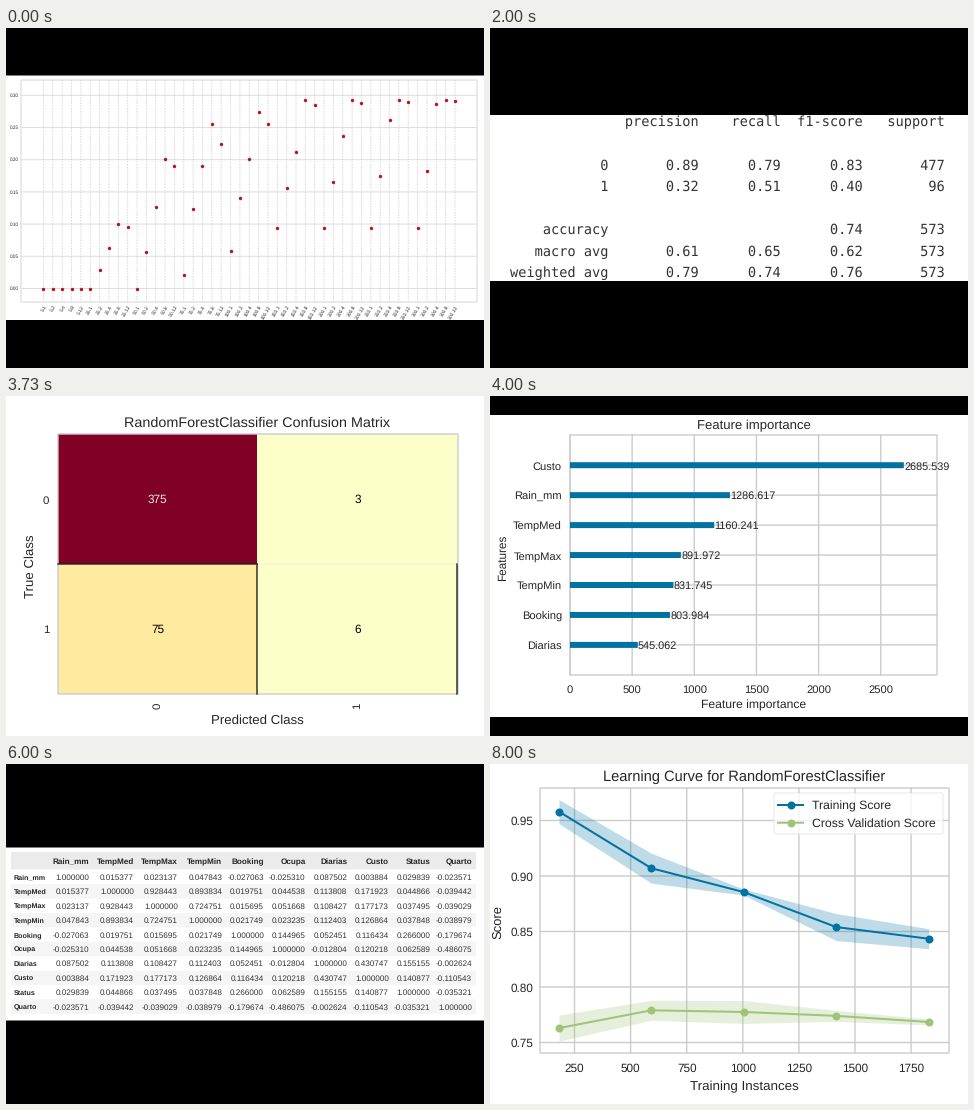
A matplotlib script for the animation above (8990 ms loop, 478 by 340 pixels).

```python
import matplotlib.pyplot as plt
import numpy as np
from matplotlib.animation import FuncAnimation
from matplotlib.patches import FancyBboxPatch, Rectangle

W, H, DPI = 478, 340, 100
STEP, LOOP, HOLD = 10, 8990, 1000
PX = 72 / DPI
BLUE, GREEN, GRID, INK = "#0272a2", "#9fc377", "#cccccc", "#262626"

plt.rcParams["font.family"] = "Liberation Sans"
plt.rcParams["text.hinting"] = "none"

fig = plt.figure(figsize=(W / DPI, H / DPI), dpi=DPI)


class Stage:
    """Pixel canvas with the origin at the top left."""

    def __init__(self, top=0, bottom=H):
        fig.clear()
        fig.set_facecolor("white" if top == 0 else "black")
        self.ax = fig.add_axes([0, 0, 1, 1])
        self.ax.set(xlim=(0, W), ylim=(H, 0))
        self.ax.axis("off")
        self.box(0, top, W, bottom, "white")

    def box(self, x0, y0, x1, y1, fill="none", edge="none", width=1.4, z=1):
        self.ax.add_patch(Rectangle((x0, y0), x1 - x0, y1 - y0, facecolor=fill,
                                    edgecolor=edge, linewidth=width * PX,
                                    zorder=z, snap=False))

    def line(self, x, y, color=GRID, width=1.4, z=2, **kw):
        self.ax.plot(x, y, color=color, lw=width * PX, zorder=z, snap=False, **kw)

    def text(self, x, y, s, size, ha="center", color=INK, rot=0, **kw):
        drop = 0.36 * size
        a = np.radians(rot)
        self.ax.text(x + drop * np.sin(a), y + drop * np.cos(a), s, size=size * PX,
                     ha=ha, va="baseline", color=color, rotation=rot,
                     rotation_mode="anchor", zorder=8, **kw)

    def legend_box(self, x0, y0, x1, y1):
        self.ax.add_patch(FancyBboxPatch(
            (x0, y0), x1 - x0, y1 - y0, boxstyle="round,pad=0,rounding_size=2",
            facecolor="white", edgecolor="#e2e2e2", alpha=0.8,
            linewidth=PX, zorder=6))

    def picture(self):
        fig.canvas.draw()
        return np.array(fig.canvas.buffer_rgba())


def scatter_slide():
    s = Stage(47.5, 292)
    s.box(15, 52, 471, 274, edge="#d6d6d6", width=1)
    for k in range(7):
        y = 260.5 - 32.2 * k
        s.line([15, 471], [y, y], "#dedede", 1)
        s.text(13, y, f"{0.05 * k:.2f}", 4.6, "right")
    sizes, depths = (5, 25, 50, 75, 100, 150, 200, 250, 300), (1, 2, 4, 8, 12)
    # Rise of the score per depth as the size grows, bent at shared knots.
    knots = (0, 2, 3, 5, 8)
    rises = ((0, 14, 61, 61), (37, 80, 101, 118), (82, 123, 137, 185),
             (130, 165, 189, 189), (123, 145, 184, 188))
    for g, n in enumerate(sizes):
        for d, depth in enumerate(depths):
            x = 37.5 + 9.352 * (5 * g + d)
            y = 260.5 - np.interp(g, knots, (0, *rises[d]))
            s.line([x, x], [52, 274], "#d0d0d0", 0.8, ls=(0, (2, 1.5)))
            s.text(x + 2, 277.5, f"{n}.{depth}", 5, "right", rot=60)
            s.line([x], [y], "#b8141a", z=5, marker="o", ms=3.4 * PX, mew=0)
    return s.picture()


def report_slide():
    s = Stage(87, 253)
    report = """precision recall f1-score support

0 0.89 0.79 0.83 477
1 0.32 0.51 0.40 96

accuracy - - 0.74 573
macro_avg 0.61 0.65 0.62 573
weighted_avg 0.79 0.74 0.76 573"""
    for k, row in enumerate(report.split("\n")):
        words = [w.strip("-").replace("_", " ") for w in row.split()]
        if k == 0:
            words.insert(0, "")
        if words:
            line = f"{words[0]:>12} " + "".join(f"{w:>10}" for w in words[1:])
            s.text(20.3, 93.6 + 21.55 * k, line, 13.65, "left", "#333333",
                   family="DejaVu Sans Mono")
    return s.picture()


def matrix_slide():
    s = Stage()
    xs, ys = (52, 251, 452), (38, 168, 298)
    cells = (("375", "#800026", "#e8e8e8"), ("3", "#fdffc9", "black"),
             ("75", "#feeb9f", "black"), ("6", "#fdffc9", "black"))
    for k, (label, fill, ink) in enumerate(cells):
        r, c = divmod(k, 2)
        s.box(xs[c], ys[r], xs[c + 1], ys[r + 1], fill)
        s.text((xs[c] + xs[c + 1]) / 2, (ys[r] + ys[r + 1]) / 2, label, 11.8,
               color=ink)
    s.box(52, 38, 452, 298, edge=GRID, z=3)
    s.line([251, 452], [168, 168], "#f4f4e0", z=4)
    s.line([52, 251], [168, 168], "#222222", z=4)
    for x in (251, 451):
        s.line([x, x], [168, 298], "#222222", z=4)
    for k in range(2):
        s.text(40, 104 + 129 * k, str(k), 11.5)
        s.text(150 + 200 * k, 310, str(k), 11.5, rot=90)
    s.text(251, 25.5, "RandomForestClassifier Confusion Matrix", 14.4)
    s.text(251.5, 323, "Predicted Class", 13.2)
    s.text(23, 170, "True Class", 13.2, rot=90)
    return s.picture()


def importance_slide():
    s = Stage(19, 321)
    scale = 62.15 / 500
    for v in range(0, 2501, 500):
        x = 80 + v * scale
        s.line([x, x], [39, 279])
        s.text(x, 293, str(v), 11.2)
    data = {"Custo": 2685.539, "Rain_mm": 1286.617, "TempMed": 1160.241,
            "TempMax": 891.972, "TempMin": 831.745, "Booking": 803.984,
            "Diarias": 545.062}
    for k, (name, v) in enumerate(data.items()):
        y, x = 69.2 + 29.95 * k, 80 + v * scale
        s.line([80, 447], [y, y])
        s.box(80, y - 3, x, y + 3, BLUE, z=4)
        s.text(x + 0.3, y + 0.3, f"{v:.3f}", 10.9, "left")
        s.text(72, y + 0.5, name, 11.1, "right")
    s.box(80, 39, 447, 279, edge=GRID, z=3)
    s.text(264, 29, "Feature importance", 13.15)
    s.text(263.5, 308, "Feature importance", 12.1)
    s.text(12, 162, "Features", 11.8, rot=90)
    return s.picture()


def table_slide():
    s = Stage(83.5, 256.5)
    names = ("Rain_mm TempMed TempMax TempMin Booking "
             "Ocupa Diarias Custo Status Quarto").split()
    # Upper triangle of the symmetric table, row by row.
    upper = [
        0.015377, 0.023137, 0.047843, -0.027063, -0.025310, 0.087502, 0.003884,
        0.029839, -0.023571,
        0.928443, 0.893834, 0.019751, 0.044538, 0.113808, 0.171923, 0.044866,
        -0.039442,
        0.724751, 0.015695, 0.051668, 0.108427, 0.177173, 0.037495, -0.039029,
        0.021749, 0.023235, 0.112403, 0.126864, 0.037848, -0.038979,
        0.144965, 0.052451, 0.116434, 0.266000, -0.179674,
        -0.012804, 0.120218, 0.062589, -0.486075,
        0.430747, 0.155155, -0.002624,
        0.140877, -0.110543, -0.035321]
    corr = np.eye(10)
    corr[np.triu_indices(10, 1)] = upper
    corr = np.maximum(corr, corr.T) + np.minimum(corr, corr.T) - np.eye(10)
    rights = np.interp(range(10), (0, 3, 9), (83.5, 216.3, 466))
    s.box(5, 88, 470, 105.5, "#ebebeb")
    for r, name in enumerate(names):
        y = 113 + 14.4 * r
        if r % 2:
            s.box(5, y - 7.2, 470, y + 7.2, "#f5f5f5")
        s.text(rights[r], 97.3, name, 8.1, "right", weight="bold")
        s.text(8, y, name, 7.1, "left", weight="bold")
        for x, v in zip(rights, corr[r]):
            s.text(x, y, f"{v:.6f}", 8.2, "right", "#333333")
    return s.picture()


def staircase(x_knots, y_knots, seed):
    """Step curve through a few knots, with slightly irregular treads."""
    rng = np.random.default_rng(seed)
    inner = np.linspace(0, 1, 75)[1:-1]
    x = np.r_[0, np.sort(inner + rng.uniform(-0.008, 0.008, inner.size)), 1]
    y = np.interp(x, x_knots, y_knots)
    return x, np.maximum.accumulate(np.clip(y + rng.normal(0, 0.004, x.size) *
                                            (1 - x), 0, 1))


def roc_slide(model, seed, aucs):
    s = Stage(8, 332)
    to_x = lambda v: 68 + 391.5 * np.asarray(v)
    to_y = lambda v: 288 - 255 * np.asarray(v)
    for v in np.arange(6) / 5:
        x, y = to_x(v), to_y(v)
        s.line([x, x], [33, 288])
        s.line([68, 459.5], [y, y])
        s.text(x, 302, f"{v:.1f}", 11.5)
        s.text(60, y, f"{v:.1f}", 11.5, "right")

    normal = staircase((0, .02, .2, .35, .6, 1), (0, .16, .57, .74, .85, 1), seed)
    cancelled = staircase((0, .1, .24, .35, .57, .84, 1),
                          (0, .27, .6, .75, .86, .96, 1), seed + 1)
    x = np.linspace(0, 1, 200)
    micro = x, 1 - (1 - x) / (1 + 17 * x)
    macro = x, (np.interp(x, *normal) + np.interp(x, *cancelled)) / 2
    dash = (0, (3.7, 1.6))
    curves = ((normal, BLUE, "-", "ROC of class Normal"),
              (cancelled, GREEN, "-", "ROC of class Cancelado"),
              (micro, GREEN, dash, "micro-average ROC curve"),
              (macro, GREEN, dash, "macro-average ROC curve"))
    s.legend_box(204, 208, 454, 283)
    for k, ((cx, cy), color, ls, label) in enumerate(curves):
        style = "steps-mid" if ls == "-" else "default"
        s.line(to_x(cx), to_y(cy), color, 2, z=4, ls=ls, drawstyle=style)
        y = 218 + 17.9 * k
        s.line([208, 233], [y, y], color, 2.1, z=7, ls=ls)
        s.text(242.5, y, f"{label}, AUC = {aucs[k]:.2f}", 11.6, "left")
    s.line([68, 459.5], [288, 33], "#222222", 2, z=4, ls=(0, (1, 1.65)))
    s.text(263.5, 21, f"ROC Curves for {model}", 14)
    s.text(263, 318, "False Positive Rate", 12.8)
    s.text(30.3, 167, "True Postive Rate", 12, rot=90)
    return s.picture()


def learning_slide(model, shift=0):
    s = Stage()
    for k in range(7):
        x = 84.5 + 56.1 * k
        s.line([x, x], [24, 289])
        s.text(x, 303.5, str(250 * (k + 1)), 11.7)
    for k in range(5):
        y = 56.5 + 55.5 * k
        s.line([50, 459], [y, y])
        s.text(43, y + 0.5, f"{0.95 - 0.05 * k:.2f}", 11.7, "right")
    s.box(50, 24, 459, 289, edge=GRID, z=3)
    s.legend_box(284, 29, 453, 70)
    xs = 69 + 92.4 * np.arange(5)
    to_y = lambda v: 56.5 + 1110 * (0.95 - np.asarray(v)) + shift
    series = (
        ("Training Score", BLUE, (0.958, 0.907, 0.8855, 0.854, 0.8435),
         (12, 15, 3, 13.5, 10)),
        ("Cross Validation Score", GREEN, (0.763, 0.779, 0.7775, 0.774, 0.7685),
         (13, 10, 11.5, 5.5, 3)))
    for k, (label, color, scores, spread) in enumerate(series):
        mid = to_y(scores)
        s.ax.fill_between(xs, mid - spread, mid + spread, color=color,
                          alpha=0.25, lw=0, zorder=4)
        s.line(xs, mid, color, 2, z=5, marker="o", ms=8 * PX, mew=0)
        y = 41 + 17.7 * k
        s.line([288, 301, 313], [y] * 3, color, 2, z=7, marker="o",
               ms=8 * PX, mew=0, markevery=[1])
        s.text(322.5, y, label, 12.2, "left")
    s.text(254, 12, f"Learning Curve for {model}", 14.6)
    s.text(254, 321.5, "Training Instances", 13.4)
    s.text(7, 158, "Score", 13, rot=90)
    return s.picture()


slides = [
    scatter_slide(),
    learning_slide("LGBMClassifier", shift=-2),
    report_slide(),
    matrix_slide(),
    importance_slide(),
    roc_slide("RandomForestClassifier", 21, (0.72, 0.72, 0.87, 0.72)),
    table_slide(),
    roc_slide("LGBMClassifier", 4, (0.73, 0.73, 0.88, 0.73)),
    learning_slide("RandomForestClassifier"),
]

fig.clear()
screen = fig.figimage(slides[0], origin="upper")


def update(i):
    screen.set_data(slides[i * STEP // HOLD])
    return [screen]


anim = FuncAnimation(fig, update, frames=LOOP // STEP, interval=STEP,
                     repeat=True, repeat_delay=0, cache_frame_data=False)
plt.show()
```
